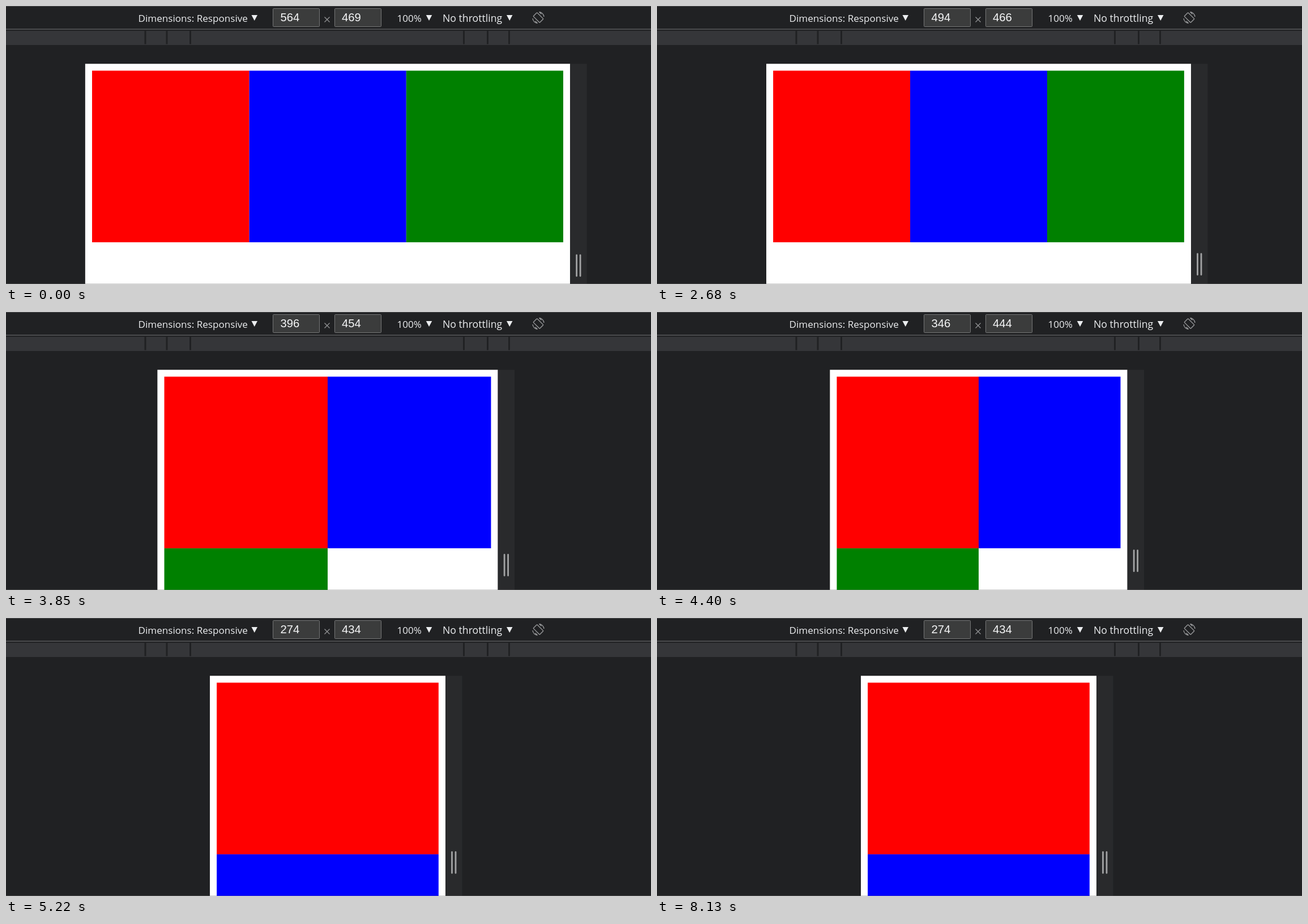
Write an HTML page that moves like this. It is 1139x492 px and loops after 8.46 s.

```html
<!DOCTYPE html>
<html lang="en">
<head>
<meta charset="utf-8">
<title>Responsive grid</title>
<style>
html, body { margin: 0; width: 100%; height: 100%; overflow: hidden; background: #202123; }
svg { display: block; }
text { font-family: "Open Sans", "Noto Sans", sans-serif; font-size: 17.1px; fill: #eceef0; }
.num { font-family: "Liberation Sans", Arial, sans-serif; font-size: 20.3px; fill: #f4f5f6; }
.field { fill: #3b3c3c; stroke: #757677; }
</style>
</head>
<body>
<svg width="1139" height="492" viewBox="0 0 1139 492">
  <defs>
    <path id="caret" d="M0 0h10.500l-5.250 10z" fill="#eceef0"/>
    <path id="turn" d="M1.500 -10A10 10 0 0 1 10 -1.500M1.500 -10l4 3.800"/>
    <path id="notch" d="M0 44V67.500" stroke="#202123" stroke-width="3"/>
  </defs>

  <path d="M0 .5H1139" stroke="#4a4b4d"/>
  <path d="M0 41H1139" stroke="#5a5b5d" stroke-width="1.3"/>
  <path d="M0 44H1139V69H0z" fill="#353639"/>
  <use href="#notch" x="246"/><use href="#notch" x="284"/><use href="#notch" x="325.5"/>
  <use href="#notch" x="808.5"/><use href="#notch" x="850.5"/><use href="#notch" x="888.5"/>

  <text x="233.5" y="28">Dimensions: Responsive</text>
  <text x="690.5" y="28">100%</text>
  <text x="771" y="28" style="font-size:17.7px">No throttling</text>
  <use href="#caret" x="433.5" y="16"/>
  <use href="#caret" x="741.8" y="16"/>
  <use href="#caret" x="884" y="16"/>
  <rect class="field" x="471.5" y="4.500" width="82" height="32" rx="1"/>
  <rect class="field" x="580.5" y="4.500" width="82" height="32" rx="1"/>
  <text class="num" id="wide" x="484.5" y="27"></text>
  <text class="num" id="high" x="593" y="27"></text>
  <path d="M562.500 19.500l9 9m0-9l-9 9" stroke="#929395" stroke-width="1.3"/>
  <g transform="translate(940 20.500)" fill="none" stroke="#98999b" stroke-width="1.4">
    <rect x="-4.700" y="-8" width="9.400" height="16" rx="1" transform="rotate(-45)"/>
    <use href="#turn"/>
    <use href="#turn" transform="rotate(180)"/>
  </g>

  <rect id="page" y="102.300" height="400" fill="#fff"/>
  <rect id="green" height="303.700" fill="#008000"/>
  <rect id="blue" height="303.700" fill="#00f"/>
  <rect id="red" height="303.700" fill="#f00"/>
  <g id="gutter">
    <rect id="strip" y="102.300" width="29.500" height="400"/>
    <path id="grip" d="M11.500 -18.500v37m6.500 0v-37" stroke="#a2a3a4" stroke-width="2.800" stroke-linecap="round"/>
  </g>
  <path d="M0 491.500H1139" stroke="#808080" stroke-opacity=".35"/>

  <circle id="touch" r="15.700" fill="#000" fill-opacity=".44" stroke="#6e6e6e" stroke-opacity=".55" stroke-width="2"/>
  <path id="arrow" d="M.5 .5V25l5.700-5.200 3.800 8.700 4.200-1.800-3.800-8.500H17.500z" fill="#fff" stroke="#000"/>
</svg>
<script>
const LOOP = 8460, TICK = 68.5;
const ZOOM = 1.5183, CENTER = 568, TOP = 102.3, MARGIN = 8, MIN_COLUMN = 130, ROW = 200;
const HOVER_START = 2130, POINTER_START = 6820, GLIDE = 810, POINTER_END = 8130;
const $ = id => document.getElementById(id);

// Each drag moves the viewport edge in discrete steps; power shapes its speed.
const drags = [
  { start: 2130, steps: 13, to: 426, power: 1.85 },
  { start: 3020, steps: 3, to: 402, power: .4 },
  { start: 3590, steps: 1, to: 400, power: 1 },
  { start: 3850, steps: 5, to: 350, power: 1.6 },
  { start: 4400, steps: 1, to: 346, power: 1 },
  { start: 4660, steps: 9, to: 274, power: .71 }
];

function set(id, attributes) {
  for (const [name, value] of Object.entries(attributes)) $(id).setAttribute(name, value);
}

function widthAt(t) {
  let width = 564;
  for (const { start, steps, to, power } of drags) {
    if (t < start) break;
    const done = Math.min(steps, Math.floor((t - start) / TICK) + 1) / steps;
    width += (to - width) * done ** power;
  }
  return Math.floor(width);
}

function heightFor(width) {
  const u = (width - 274) / 290;
  return Math.floor(434 + 35.2 * (1 - (1 - u ** 1.4) ** 2.4));
}

function drawPage(t) {
  const width = widthAt(t), height = heightFor(width);
  const content = width - 2 * MARGIN;
  const columns = Math.min(3, Math.floor(content / MIN_COLUMN));
  const left = CENTER - width * ZOOM / 2;
  const cell = content * ZOOM / columns;

  set('page', { x: left, width: width * ZOOM });
  ['red', 'blue', 'green'].forEach((id, i) => set(id, {
    x: left + MARGIN * ZOOM + i % columns * cell,
    y: TOP + MARGIN * ZOOM + Math.floor(i / columns) * ROW * ZOOM,
    width: cell
  }));
  set('gutter', { transform: `translate(${left + width * ZOOM} 0)` });
  set('grip', { transform: `translate(0 ${TOP + 1 + height * ZOOM / 2})` });
  const hovered = t >= HOVER_START && t < HOVER_START + TICK;
  set('strip', { fill: hovered ? '#353639' : '#292a2c' });
  $('wide').textContent = width;
  $('high').textContent = height;
}

const bezier = (p, a, b, c, d) => {
  const q = 1 - p;
  return q * q * q * a + 3 * q * q * p * b + 3 * q * p * p * c + p * p * p * d;
};

// A curved glide out of the page, then a slowing drift off the bottom.
function pointerAt(t) {
  const elapsed = Math.floor((t - POINTER_START) / TICK) * TICK;
  const p = Math.min(1, elapsed / GLIDE);
  const rest = Math.max(0, elapsed - GLIDE) / (POINTER_END - POINTER_START - GLIDE);
  const drift = 1 - (1 - rest) ** 2;
  return [
    bezier(p, 502, 415, 800, 970) + 67 * drift,
    bezier(p, 263, 265, 150, 440) + 48 * drift
  ];
}

function drawPointer(t) {
  const visible = t >= POINTER_START && t < POINTER_END;
  const [x, y] = pointerAt(t);
  const inPage = x < CENTER + widthAt(t) * ZOOM / 2;
  const transform = `translate(${x} ${y})`;
  set('touch', { transform, visibility: visible && inPage ? 'visible' : 'hidden' });
  set('arrow', { transform, visibility: visible && !inPage ? 'visible' : 'hidden' });
}

const begin = performance.now();
function frame() {
  const t = (performance.now() - begin) % LOOP;
  drawPage(t);
  drawPointer(t);
  requestAnimationFrame(frame);
}
frame();
</script>
</body>
</html>
```
